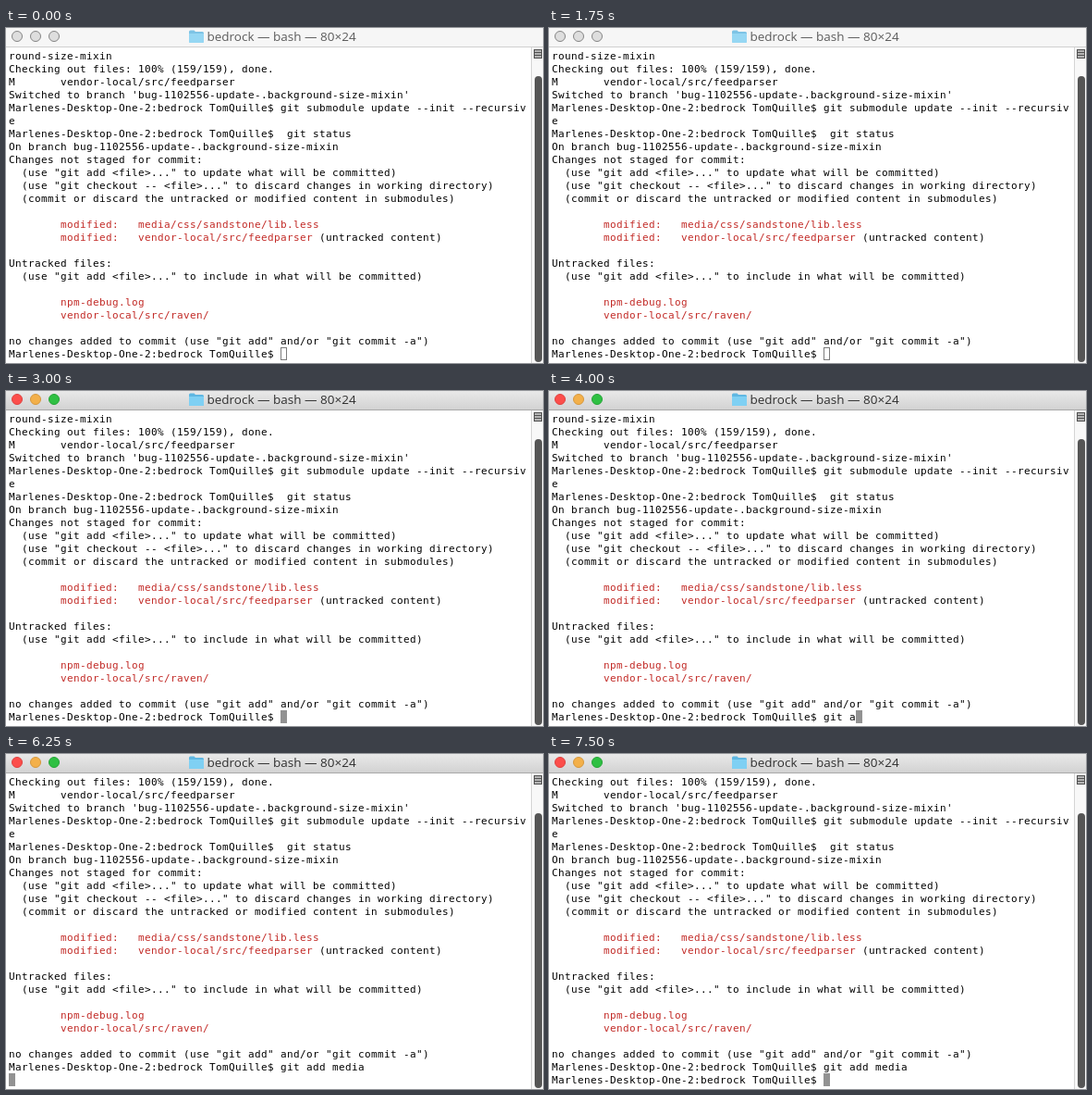
An HTML page for the animation above (8000 ms loop, 581x362 px).

```html
<!DOCTYPE html>
<html lang="en">
<head>
<meta charset="utf-8">
<title>Terminal</title>
<style>
  html, body { margin: 0; width: 100%; height: 100%; overflow: hidden; background: #fff; }
  svg { display: block; width: 581px; height: 362px; }
  .mono { font: 11px "DejaVu Sans Mono", monospace; fill: #000; }
  .mono text, .mono tspan { white-space: pre; }
  .red { fill: #c22a26; }
  .title { font: 13.5px "Open Sans", "Noto Sans", sans-serif; }
</style>
</head>
<body>
<svg viewBox="0 0 581 362" xmlns="http://www.w3.org/2000/svg">
  <defs>
    <linearGradient id="active" x2="0" y2="1">
      <stop offset="0" stop-color="#e9e9e9"/>
      <stop offset="1" stop-color="#d2d2d2"/>
    </linearGradient>
  </defs>
  <rect width="581" height="362" fill="#fff"/>

  <g id="screen" class="mono"></g>
  <rect id="caret" width="6" height="13"/>

  <rect x="568" y="21" width="13" height="341" fill="#f8f8f8"/>
  <path d="M568.5 21V362" stroke="#d4d4d4" fill="none"/>
  <rect x="571.5" y="23.5" width="8" height="9" fill="#b4b4b4" stroke="#505050"/>
  <path d="M572 26.5H579M572 29.5H579" stroke="#505050"/>
  <rect id="thumb" x="572" width="8" rx="4" fill="#555"/>

  <rect id="bar" width="581" height="20"/>
  <path id="edge" d="M0 20.5H581"/>
  <g id="lights"></g>
  <g id="folder">
    <path d="M198 4q0-1.5 1.5-1.5h4l1.5 1.5h7.5q1.5 0 1.5 1.5v9q0 1.5-1.5 1.5h-13q-1.5 0-1.5-1.5z" fill="#5fb7e2"/>
    <path d="M198 6h16v8.5q0 1.5-1.5 1.5h-13q-1.5 0-1.5-1.5z" fill="#7fd0f3"/>
  </g>
  <text id="title" class="title" x="217.5" y="14">bedrock — bash — 80×24</text>

  <path id="mouse" d="M0 0V14.5L3.3 11.4L5.6 16.6L8 15.5L5.7 10.5H10.3Z" fill="#000" stroke="#fff" stroke-linejoin="round"/>
</svg>
<script>
const LOOP = 8000, CELL = 7, LINE = 14, LEFT = 3, TOP = 23, ROWS = 24;
const FOCUS = 2250, ENTER = 6250, DONE = 6500;
const COMMAND = "git add media";
const PROMPT = "Marlenes-Desktop-One-2:bedrock TomQuille$ ";
const PAD = " ".repeat(8);

// A leading "~" makes the text red up to the "|" mark.
const log = [
  "round-size-mixin",
  "Checking out files: 100% (159/159), done.",
  "M       vendor-local/src/feedparser",
  "Switched to branch 'bug-1102556-update-.background-size-mixin'",
  PROMPT + "git submodule update --init --recursiv",
  "e",
  PROMPT + " git status",
  "On branch bug-1102556-update-.background-size-mixin",
  "Changes not staged for commit:",
  '  (use "git add <file>..." to update what will be committed)',
  '  (use "git checkout -- <file>..." to discard changes in working directory)',
  "  (commit or discard the untracked or modified content in submodules)",
  "",
  "~" + PAD + "modified:   media/css/sandstone/lib.less",
  "~" + PAD + "modified:   vendor-local/src/feedparser| (untracked content)",
  "",
  "Untracked files:",
  '  (use "git add <file>..." to include in what will be committed)',
  "",
  "~" + PAD + "npm-debug.log",
  "~" + PAD + "vendor-local/src/raven/",
  "",
  'no changes added to commit (use "git add" and/or "git commit -a")'
];

// [time, typed characters]
const typing = [[0, 0], [3500, 2], [3750, 4], [4000, 5], [4250, 7],
  [4500, 9], [4750, 10], [5000, 12], [5250, 13]];

// [time, x, y] of the pointer tip; no position means hidden
const pointer = [[0], [250, 556, 20], [500, 391, 328], [1250, 389, 331],
  [1500, 384, 341], [1750], [2250, 336, 352], [2500, 425, 161],
  [2750, 557, -10], [3000]];

const $ = id => document.getElementById(id);
const set = (el, attrs) => {
  for (const key in attrs) el.setAttribute(key, attrs[key]);
  return el;
};
const add = (parent, tag, attrs = {}) =>
  parent.appendChild(set(document.createElementNS("http://www.w3.org/2000/svg", tag), attrs));
const at = (steps, t) => steps.filter(step => step[0] <= t).pop();

const lines = Array.from({ length: ROWS }, (_, i) => {
  const text = add($("screen"), "text", { x: LEFT, y: TOP + 11 + i * LINE });
  return [add(text, "tspan", { class: "red" }), add(text, "tspan")];
});
const lights = [12, 32, 52].map(cx => add($("lights"), "circle", { cx, cy: 9, r: 5.5 }));

// Snap the font's advance to the whole-pixel cell grid.
const probe = lines[0][1];
probe.textContent = "x".repeat(80);
$("screen").style.letterSpacing = CELL - probe.getComputedTextLength() / 80 + "px";

function drawLine([red, black], line) {
  const parts = line[0] === "~" ? line.slice(1).split("|") : ["", line];
  red.textContent = parts[0];
  black.textContent = parts[1] || "";
}

function drawWindow(active) {
  set($("bar"), { fill: active ? "url(#active)" : "#f6f6f6" });
  set($("edge"), { stroke: active ? "#a9a9a9" : "#cfcfcf" });
  set($("title"), { fill: active ? "#303030" : "#5c5c5c" });
  set($("folder"), { opacity: active ? 1 : 0.8 });
  const fills = active ? ["#fc4e4b", "#f3b04a", "#2fc043"] : Array(3).fill("#dedede");
  const rims = active ? ["#df4240", "#d6983c", "#25a537"] : Array(3).fill("#858585");
  lights.forEach((light, i) => set(light, { fill: fills[i], stroke: rims[i] }));
}

let last = "";
function draw(t) {
  const active = t >= FOCUS, scrolled = t >= ENTER;
  const count = at(typing, t)[1];
  const mouse = at(pointer, t);
  const state = [active, scrolled, t >= DONE, count, mouse].join();
  if (state === last) return;
  last = state;

  const rows = [...log, PROMPT + COMMAND.slice(0, count)];
  if (scrolled) rows.push(t >= DONE ? PROMPT : "");
  rows.slice(-ROWS).forEach((line, i) => drawLine(lines[i], line));

  set($("caret"), {
    x: LEFT + rows[rows.length - 1].length * CELL + 0.5,
    y: TOP + (ROWS - 1) * LINE + 0.5,
    fill: active ? "#929292" : "none",
    stroke: active ? "#929292" : "#7c7c7c"
  });
  const top = scrolled ? 64 : 52;
  set($("thumb"), { y: top, height: 361 - top });
  drawWindow(active);
  set($("mouse"), mouse.length > 1
    ? { visibility: "visible", transform: `translate(${mouse[1]} ${mouse[2]})` }
    : { visibility: "hidden" });
}

const start = performance.now();
function tick() {
  draw((performance.now() - start) % LOOP);
  requestAnimationFrame(tick);
}
tick();
</script>
</body>
</html>
```
